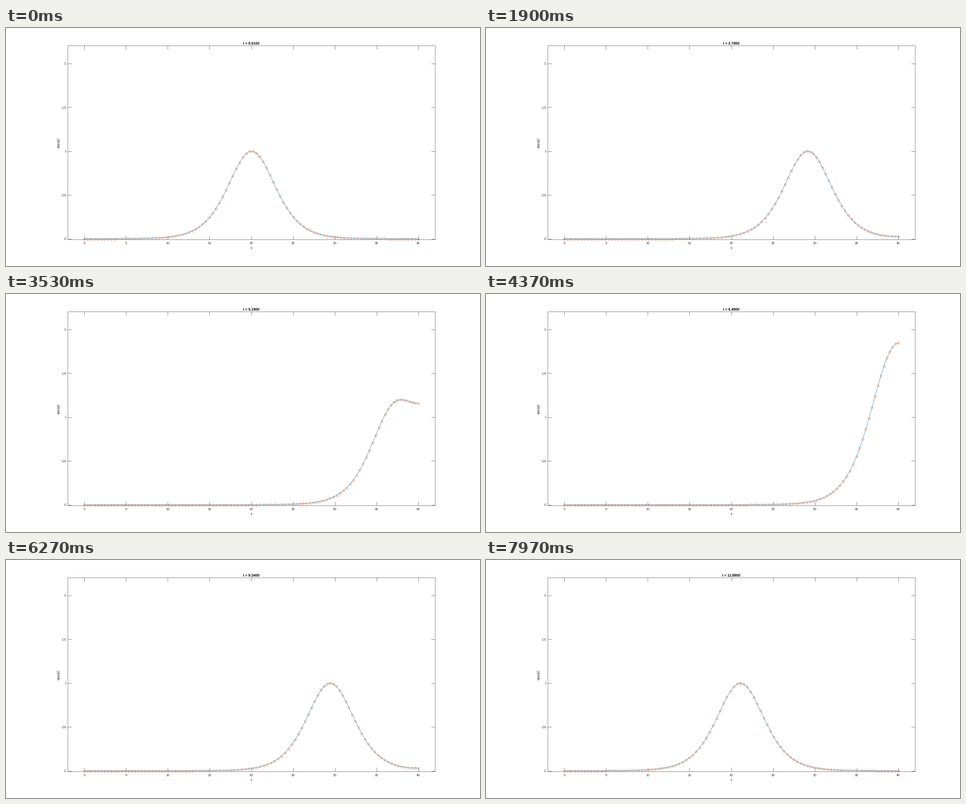
Write a matplotlib script that moves like this. It is 1000 px wide and 502 px high and loops after 8000 ms.

```python
import numpy as np
import matplotlib
import matplotlib.pyplot as plt
from matplotlib.animation import FuncAnimation

matplotlib.rcParams["font.family"] = "Liberation Sans"
matplotlib.rcParams["text.hinting"] = "none"

W, H, DPI = 1000, 502, 100
PX = 72 / DPI                       # points per pixel
FRAMES, LOOP_MS = 240, 8000
INK, BLUE, ORANGE = "#262626", "#0072BD", "#D95319"

# Solitary wave that runs into a wall at the right end of the tank
AMP = 0.1                           # wave height / depth
SPEED = np.sqrt(9.81 * (1 + AMP))
DECAY = 0.264
START, WALL = 20.0, 40.0
DELAY = 0.14                        # phase lag gained in the reflection

GRID = np.linspace(0, WALL, 2001)
LABELS = np.linspace(0, WALL, 100)  # starting places of the particles


def incident(x, t):
    """Right-going wave, held back where it has met its mirror image."""
    crest = START + SPEED * t
    met = 0.5 * (1 + np.tanh(DECAY * (x - (2 * WALL - crest))))
    return 1 / np.cosh(DECAY * (x - crest + DELAY * met)) ** 2


def elevation(x, t):
    a, b = incident(x, t), incident(2 * WALL - x, t)
    return a + b + 0.5 * AMP * a * b


def mass(t):
    """Share of the water to the left of each grid point."""
    depth = 1 + AMP * elevation(GRID, t)
    total = np.concatenate(([0], np.cumsum((depth[1:] + depth[:-1]) / 2)))
    return total / total[-1]


PARTICLE_MASS = np.interp(LABELS, GRID, mass(0))


def particles(t):
    x = np.interp(PARTICLE_MASS, mass(t), GRID)
    return x, elevation(x, t)


def clock(frame):
    return 0.01 * (frame + 1) if frame < 2 else 0.05 * frame - 0.06


# The small margin keeps the pixel size from being rounded down
fig = plt.figure(figsize=((W + 0.01) / DPI, (H + 0.01) / DPI), dpi=DPI,
                 facecolor="white")

LEFT, RIGHT, TOP, BOTTOM = 130, 905, 37.5, 446.5
ax = fig.add_axes([LEFT / W, 1 - BOTTOM / H, (RIGHT - LEFT) / W, (BOTTOM - TOP) / H])
ax.set(xlim=(-2, 42), ylim=(-0.01, 2.2))
ax.set_xticks(range(0, 41, 5))
ax.set_yticks([0, 0.5, 1, 1.5, 2])
ax.tick_params(direction="in", length=7.75 * PX, width=0.55 * PX, color=INK,
               top=True, right=True, labelbottom=False, labelleft=False)
for spine in ax.spines.values():
    spine.set(linewidth=0.55 * PX, edgecolor=INK)


def label(x, y, s, size=7.0, ha="center", **kw):
    """Text with its baseline at a pixel position measured from the top left."""
    kw.setdefault("color", INK)
    return fig.text(x / W, 1 - y / H, s, fontsize=size * PX, ha=ha,
                    va="baseline", rotation_mode="anchor", **kw)


for v in ax.get_xticks():
    label(LEFT + (v + 2) / 44 * (RIGHT - LEFT), 456.4, f"{v:g}")
for v in ax.get_yticks():
    label(127, BOTTOM - (v + 0.01) / 2.21 * (BOTTOM - TOP) + 2.6, f"{v:g}", ha="right")
label(517.5, 466.3, "x", 7.7)
label(113.4, 242, "eta/a0", 7.7, rotation=90)
title = label(517.5, 34.8, "", 7.7, weight="bold", color="black")

curve, = ax.plot([], [], color=BLUE, lw=0.6 * PX, zorder=3)
dots, = ax.plot([], [], "o", ms=4.2 * PX, mfc="none", mec=ORANGE,
                mew=0.55 * PX, zorder=4, clip_on=False)


def draw(frame):
    t = clock(frame)
    x, y = particles(t)
    curve.set_data(x, y)
    dots.set_data(x, y)
    title.set_text(f"t = {t:.4f}")
    return curve, dots, title


anim = FuncAnimation(fig, draw, frames=FRAMES, interval=LOOP_MS / FRAMES,
                     repeat=True, repeat_delay=0, blit=False)
plt.show()
```
